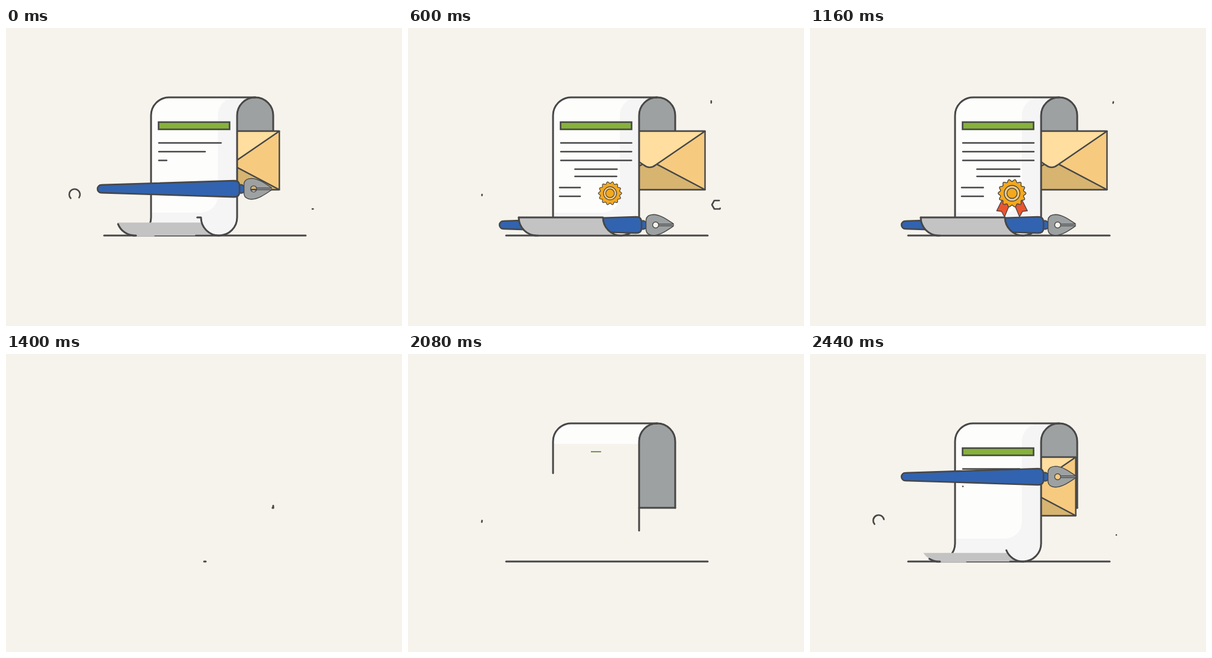
An HTML page that plays this animation: 658x494 px, repeating every 2480 ms.

```html
<!DOCTYPE html>
<html lang="en">
<head>
<meta charset="utf-8">
<title>Document, pen and envelope</title>
<style>
html, body { margin: 0; width: 100%; height: 100%; overflow: hidden; background: #f6f3ec; }
svg { display: block; width: 100%; height: 100%; }
.ink { fill: none; stroke: #474747; stroke-width: 3; stroke-linecap: round; stroke-linejoin: round; }
.fine { stroke-width: 2.6; }
.thin { stroke: #474747; stroke-width: 1.4; stroke-linejoin: round; }
</style>
</head>
<body>
<svg viewBox="0 0 658 494">
  <defs>
    <clipPath id="backClip"><rect id="backWipe" x="380" y="113" width="70" height="0"/></clipPath>
    <clipPath id="paperClip"><rect id="paperWipe" x="200" y="113" width="260" height="0"/></clipPath>
    <clipPath id="flapClip"><rect id="flapWipe" x="180" width="180" height="60"/></clipPath>
    <clipPath id="mailClip"><rect x="384" y="160" width="140" height="120"/></clipPath>
  </defs>
  <path id="ring" class="ink fine"/>
  <path id="dot" class="ink fine"/>
  <polyline id="hex" class="ink fine"/>
  <path id="ground" class="ink"/>
  <path clip-path="url(#backClip)" fill="#9da1a1" d="M384 255V145A30 30 0 0 1 444 145V255Z"/>
  <path id="backEdge" class="ink" d="M444 255H384"/>
  <path id="backSide" class="ink" d="M444 255V145A30 30 0 0 0 414 115"/>
  <g clip-path="url(#mailClip)">
    <g id="mail" stroke="#474747" stroke-width="2.4" stroke-linejoin="round">
      <path fill="#f6cb80" d="M-184 171H0V268H-184Z"/>
      <path fill="#d7b470" d="M-184 268L-92 219.600L0 268Z"/>
      <path fill="#ffde9f" d="M-184 171L-102 227Q-92 235 -82 227L0 171Z"/>
    </g>
  </g>
  <g clip-path="url(#paperClip)">
    <path fill="#fdfdfc" d="M241 145A30 30 0 0 1 271 115H414A30 30 0 0 0 384 145V314A30 30 0 0 1 354 344H211A30 30 0 0 0 241 314Z"/>
    <path id="shade" fill="#f5f5f6" d="M414 115H382A30 30 0 0 0 352 145V278A28 28 0 0 1 324 306H241V314A30 30 0 0 1 211 344H354A30 30 0 0 0 384 314V145A30 30 0 0 1 414 115Z"/>
  </g>
  <path id="leftEdge" class="ink" d="M414 115H271A30 30 0 0 0 241 145V314A30 30 0 0 1 211 344"/>
  <path id="rightEdge" class="ink" d="M414 115A30 30 0 0 0 384 145V314A30 30 0 0 1 354 344"/>
  <g id="bar"><rect x="-59" y="-6" width="118" height="12" fill="#86b23b" stroke="#474747" stroke-width="2.6"/></g>
  <g id="lines"></g>
  <g transform="translate(335.700 274)">
    <path id="ribbonL" class="thin" fill="#e9552f"/>
    <path id="ribbonR" class="thin" fill="#e9552f"/>
    <g id="badge">
      <path id="gear" class="thin" fill="#f4a81d"/>
      <circle class="thin" r="13" fill="#f9cb80"/>
      <circle class="thin" r="8.500" fill="#f4a81d"/>
    </g>
  </g>
  <g id="pen">
    <path d="M386 -7H392L396 -4V5L392 7H386Z" fill="#3163b0" stroke="#474747" stroke-width="2"/>
    <path d="M158.500 -6.500L379 -13.500Q388 -13.500 388 -5V5Q388 13.500 379 13.500L158.500 6.500A6.500 6.500 0 0 1 158.500 -6.500Z" fill="#3163b0" stroke="#474747" stroke-width="2.6"/>
    <path class="thin" fill="#9da1a1" fill-rule="evenodd" d="M395.500 -9Q397 -17 408 -17.300C420 -17 432 -8 441 -2V2C432 8 420 17 408 17.300Q397 17 395.500 9Z M406.500 0A5 5 0 1 0 416.500 0A5 5 0 1 0 406.500 0Z"/>
    <path d="M416 0H441" stroke="#474747" stroke-width="4"/>
    <path d="M417 0H441" stroke="#a9acac" stroke-width="1.2"/>
  </g>
  <path clip-path="url(#flapClip)" fill="#c3c3c3" d="M184 314H324A30 30 0 0 0 354 344H214A30 30 0 0 1 184 314Z"/>
  <path id="gap" stroke="#c3c3c3" stroke-width="3"/>
  <path id="base" class="ink fine"/>
  <path id="curl" class="ink" d="M354 344A30 30 0 0 1 324 314H184"/>
  <path id="flapSide" class="ink" d="M216 344H214A30 30 0 0 1 184 314"/>
</svg>
<script>
const LOOP = 2480, CUT = 1350;  // the stage empties at CUT, then the drawing starts over
const $ = id => document.getElementById(id);
const set = (id, name, value) => $(id).setAttribute(name, value);
const show = (id, on) => { $(id).style.visibility = on ? 'visible' : 'hidden'; };

// Progress from time a to time b, and easings on it
const span = (t, a, b) => Math.max(0, Math.min(1, (t - a) / (b - a)));
const smooth = x => x * x * (3 - 2 * x);
const out = (x, p) => 1 - Math.pow(1 - x, p);
const back = (x, c) => 1 + (c + 1) * (x - 1) ** 3 + c * (x - 1) ** 2;

// Linear interpolation through [time, value] pairs
function key(t, ...pts) {
  const i = pts.findIndex(p => t < p[0]);
  if (i < 0) return pts[pts.length - 1][1];
  if (i === 0) return pts[0][1];
  const [a, v] = pts[i - 1], [b, w] = pts[i];
  return v + (w - v) * span(t, a, b);
}

function trim(el, len) {
  el.style.visibility = len > 0 ? 'visible' : 'hidden';
  el.setAttribute('stroke-dasharray', Math.max(len, 0.01) + ' 2000');
}

const polar = (r, a) => [r * Math.cos(a), r * Math.sin(a)];

const rows = [];
function addRows(count, x, y, step, len, start, delay) {
  for (let i = 0; i < count; i++) {
    const el = document.createElementNS('http://www.w3.org/2000/svg', 'path');
    el.setAttribute('class', 'ink fine');
    el.setAttribute('d', `M${x} ${y + i * step}h${len}`);
    $('lines').append(el);
    rows.push({ el, len, start: start + i * delay });
  }
}
addRows(3, 254, 190.5, 14.5, 118, -205, 80);
addRows(2, 277.5, 234, 12, 71, 150, 75);
addRows(2, 252, 264.5, 14.5, 36, 312, 0);

const gear = [];
for (let i = 0; i < 168; i++) {
  const a = i / 84 * Math.PI;
  gear.push(polar(21.3 + 1.8 * Math.cos(14 * a), a));
}
set('gear', 'd', 'M' + gear.join('L') + 'Z');

function arc(id, cx, cy, r, from, to) {
  show(id, to - from > 0.5);
  const at = deg => {
    const [x, y] = polar(r, deg * Math.PI / 180);
    return `${cx + x} ${cy + y}`;
  };
  set(id, 'd', `M${at(from)}A${r} ${r} 0 ${+(to - from > 180)} 1 ${at(to)}`);
}

const corners = [[509, 300], [505, 293], [509, 286], [518, 286], [522, 293], [518, 300]];
function hexPoint(p) {
  const i = Math.floor(p), f = p - i;
  const a = corners[(i + 12) % 6], b = corners[(i + 13) % 6];
  return [a[0] + (b[0] - a[0]) * f, a[1] + (b[1] - a[1]) * f];
}
function hexTrim(from, to) {
  const pts = [hexPoint(from)];
  for (let k = Math.floor(from) + 1; k < to; k++) pts.push(hexPoint(k));
  pts.push(hexPoint(to));
  set('hex', 'points', pts.join(' '));
}

function penY(t) {
  if (t < 40) return -30 + 295 * Math.pow(Math.max(0, t + 300) / 300, 1.68);
  const hop = (a, b, h) => { const u = span(t, a, b); return 4 * h * u * (1 - u); };
  return 326.5 - hop(40, 420, 20) - hop(420, 540, 3);
}

function ribbon(id, side, grow) {
  show(id, grow > 0);
  const pt = (x, y) => `${side * (4 + (x - 4) * grow)} ${10 + (y - 10) * grow}`;
  set(id, 'd', `M${side * 16} 10L${pt(25.5, 29)}L${pt(17.5, 30)}L${pt(12.5, 39)}L${side * 2} 14Z`);
}

// Small outlines: the front end runs ahead, the rear end catches up
function decor(t) {
  arc('ring', 114, 276, 9,
    key(t, [-430, 380], [-40, 138], [320, 120], [620, -8]),
    key(t, [-430, 380], [-40, 347], [0, 395], [320, 280], [620, -8]));

  const d = span(t, 570, 1180);
  arc('dot', 499, 122.5, 5, 380 - 380 * out(d, 2), 380 - 380 * d * d);

  const h = span(t, -8, 1000);
  hexTrim(6 - 8.5 * out(h, 2), 6 - 8.5 * h * h);
  show('hex', t > -70 && h < 1);
}

function paper(t) {
  const half = 167.5 * smooth(span(t, -1105, -620));
  set('ground', 'd', `M${330.5 - half} 344H${330.5 + half}`);
  show('ground', half > 0);

  const left = 565 * span(t, -1085, -115);
  trim($('backSide'), left);
  trim($('leftEdge'), left - 157);
  trim($('backEdge'), 60 * span(t, -1085, -780));
  trim($('rightEdge'), 263 * out(span(t, -815, -143), 1.4));
  trim($('curl'), 187 * Math.pow(span(t, -143, 250), 1.25));
  trim($('flapSide'), 50 * span(t, -78, 27));

  set('backWipe', 'height', 142 * smooth(span(t, -740, -440)));
  set('paperWipe', 'height', 232 * span(t, -440, -175));
  set('shade', 'opacity', span(t, -380, -120));
  set('flapWipe', 'y', 344 - 31 * span(t, -117, 54));

  const close = span(t, -40, 92), sweep = span(t, -90, 233);
  show('gap', t > -100 && close < 1);
  set('gap', 'd', `M217 344H${260 - 43 * close}`);
  show('base', sweep > 0);
  set('base', 'd', `M${354 - 137 * sweep} 344H354`);
}

function details(t) {
  const size = smooth(span(t, -448, -240));
  show('bar', size > 0);
  set('bar', 'transform', `translate(312.5 162)scale(${size})`);

  for (const { el, len, start } of rows) {
    const age = Math.max(0, t - start);
    trim(el, len / (1 + Math.pow(100 / age, 2.7)));
  }

  show('mail', t > -178);
  set('mail', 'transform', `translate(${380 + 113.5 * back(span(t, -178, 622), 0.9)})`);

  show('badge', t > 500);
  set('badge', 'transform', `scale(${back(span(t, 500, 833), 1.2)})`);
  ribbon('ribbonL', -1, smooth(span(t, 680, 860)));
  ribbon('ribbonR', 1, smooth(span(t, 760, 980)));

  show('pen', t > -300);
  set('pen', 'transform', `translate(0 ${penY(t)})`);
}

function draw(now) {
  const phase = now % LOOP;
  const t = phase < CUT ? phase : phase - LOOP;
  decor(t);
  paper(t);
  details(t);
}

const begin = performance.now();
function tick() {
  draw(performance.now() - begin);
  requestAnimationFrame(tick);
}
tick();
</script>
</body>
</html>
```
